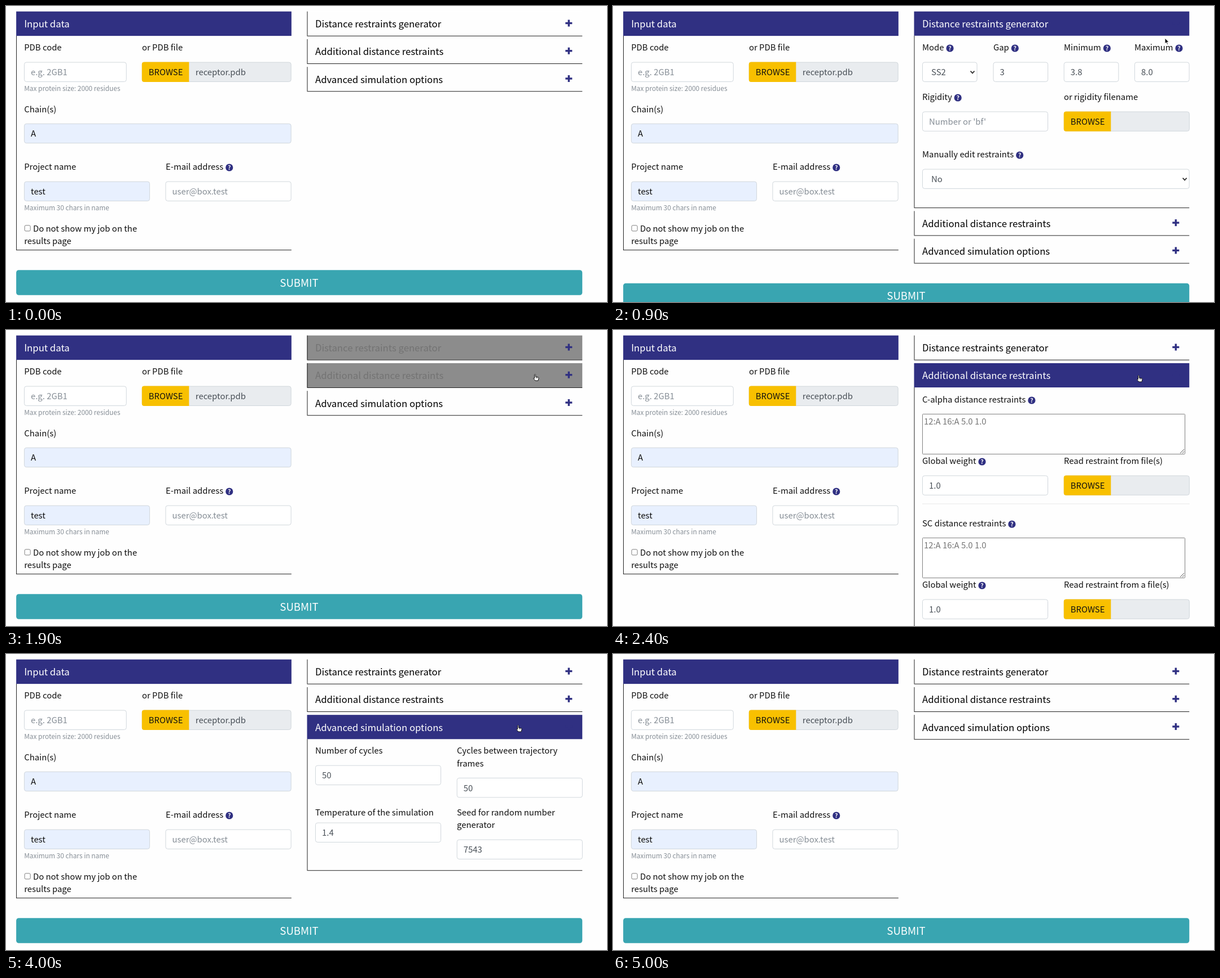
Animation, 1065 px wide and 526 px high, one loop 5300 ms. Source, as an HTML page with a canvas:

```html
<!DOCTYPE html>
<html lang="en">
<head>
<meta charset="utf-8">
<title>Simulation form</title>
<style>
  html, body { margin: 0; width: 100%; height: 100%; overflow: hidden; background: #fefefe; }
  canvas { display: block; }
</style>
</head>
<body>
<canvas id="stage" width="1065" height="526"></canvas>
<script>
const ctx = document.getElementById('stage').getContext('2d');
const LOOP = 5300, STEP = 100;
const FAMILY = '"Noto Sans CJK JP", "Noto Sans CJK SC", "Noto Sans CJK KR", "Noto Sans", sans-serif';
const NAVY = '#303082', YELLOW = '#f8c000', TEAL = '#39a5b1', INK = '#111';
const VALUE = '#495057', MUTED = '#868e96', BORDER = '#ced4da', AUTOFILL = '#e8f0fe';

// The form is shown at slightly under full size, so edges fall between pixels.
const SCALE = 0.929;
const BODY = 16 * SCALE, HEADING = 18 * SCALE, SMALL = 12.8 * SCALE, LARGE = 20 * SCALE;
const CONTROL = 38 * SCALE, LINE = SCALE;
const LEFT = 18.1, RIGHT = 533.5, COLUMN = 525 * SCALE;

const clamp = v => Math.min(1, Math.max(0, v));
const swing = v => 0.5 - Math.cos(Math.PI * clamp(v)) / 2;
const mix = (a, b, p) => a + (b - a) * p;

// ---- drawing helpers -------------------------------------------------

function rect(x, y, w, h, color) {
  ctx.fillStyle = color;
  ctx.fillRect(x, y, w, h);
}

function roundRect(x, y, w, h, radius, color) {
  ctx.beginPath();
  ctx.roundRect(x, y, w, h, radius);
  ctx.fillStyle = color;
  ctx.fill();
}

function line(points, color, width) {
  ctx.beginPath();
  points.forEach(([x, y]) => ctx.lineTo(x, y));
  ctx.strokeStyle = color;
  ctx.lineWidth = width;
  ctx.stroke();
}

// y is the middle of the capital letters
function text(str, x, y, color = INK, size = BODY, align = 'left') {
  ctx.font = `${size}px ${FAMILY}`;
  ctx.textAlign = align;
  ctx.fillStyle = color;
  ctx.fillText(str, x, y + size * 0.366);
}

function label(str, x, y, help) {
  text(str, x, y);
  if (!help) return;
  const cx = x + ctx.measureText(str).width + 10.5;
  ctx.beginPath();
  ctx.arc(cx, y + 1, 6.6, 0, 7);
  ctx.fillStyle = NAVY;
  ctx.fill();
  ctx.font = `bold 10.5px ${FAMILY}`;
  ctx.textAlign = 'center';
  ctx.fillStyle = '#fff';
  ctx.fillText('?', cx, y + 4.9);
}

function box(x, y, w, h, fill, stroke = BORDER, radius = 4 * SCALE) {
  roundRect(x + LINE / 2, y + LINE / 2, w - LINE, h - LINE, radius, fill);
  ctx.strokeStyle = stroke;
  ctx.lineWidth = LINE;
  ctx.stroke();
}

function input(str, x, y, w, color = VALUE, fill = '#fff') {
  box(x, y, w, CONTROL, fill);
  text(str, x + 12, y + 18.2, color);
}

function select(str, x, y, w) {
  box(x, y, w, CONTROL, '#fff');
  text(str, x + 16, y + 18.2, VALUE);
  const cx = x + w - 8.5, cy = y + 18;
  line([[cx - 3.5, cy - 2], [cx, cy + 1.8], [cx + 3.5, cy - 2]], '#333', 1.8);
}

function filePicker(x, y, w, name = '') {
  box(x, y, w, CONTROL, '#e9ecef');
  roundRect(x, y, 83.5, CONTROL, [4, 0, 0, 4], YELLOW);
  text('BROWSE', x + 12, y + 18.2);
  text(name, x + 95, y + 18.2, VALUE);
}

function textarea(str, x, y, w, h) {
  box(x, y, w, h, '#fff', '#767676', 1);
  text(str, x + 3, y + 14, '#757575');
  const r = x + w - 2, b = y + h - 2;
  line([[r - 7, b], [r, b - 7]], '#555', 1);
  line([[r - 3, b], [r, b - 3]], '#555', 1);
}

function plus(x, y) {
  rect(x - 6, y - 1.7, 12, 3.4, NAVY);
  rect(x - 1.7, y - 6, 3.4, 12, NAVY);
}

// ---- static left column ----------------------------------------------

function drawInputPanel() {
  rect(LEFT, 53, LINE, 381, INK);
  rect(LEFT, 433.2, COLUMN, LINE, INK);
  rect(LEFT, 9.7, COLUMN, 43.4, NAVY);
  text('Input data', 32.2, 32, '#fff', HEADING);
  label('PDB code', 32.2, 74);
  label('or PDB file', 241, 74);
  input('e.g. 2GB1', 32, 99.6, 181.7, MUTED);
  filePicker(240.8, 99.6, 264.8, 'receptor.pdb');
  text('Max protein size: 2000 residues', 32.2, 147, MUTED, SMALL);
  label('Chain(s)', 32.2, 183.2);
  input('A', 32, 208.8, 473.6, INK, AUTOFILL);
  label('Project name', 32.2, 286);
  label('E-mail address', 283, 286, true);
  input('test', 32, 311.6, 223, INK, AUTOFILL);
  input('user@box.test', 282.5, 311.6, 223.1, MUTED);
  text('Maximum 30 chars in name', 32.2, 359, MUTED, SMALL);
  box(32.6, 389.4, 11, 11, '#fff', '#767676', 2);
  text('Do not show my job on the', 48, 395.3);
  text('results page', 32.2, 417.6);
}

// ---- accordion -------------------------------------------------------

function generatorBody() {
  label('Mode', 548, 74, true);
  label('Gap', 674, 74, true);
  label('Minimum', 799, 74, true);
  label('Maximum', 924, 74, true);
  select('SS2', 548, 99.6, 97.5);
  input('3', 673.6, 99.6, 97.5);
  input('3.8', 798.8, 99.6, 97.5);
  input('8.0', 924, 99.6, 97.5);
  label('Rigidity', 548, 162, true);
  label('or rigidity filename', 799, 162);
  input("Number or 'bf'", 548, 187.5, 223, MUTED);
  filePicker(798.8, 187.5, 223);
  label('Manually edit restraints', 548, 264, true);
  select('No', 548, 289.6, 473.6);
}

function restraintGroup(title, fileLabel, y) {
  label(title, 548, y, true);
  textarea('12:A 16:A 5.0 1.0', 548, y + 25, 466, 72);
  label('Global weight', 548, y + 109, true);
  label(fileLabel, 799, y + 109);
  input('1.0', 548, y + 134.5, 223);
  filePicker(798.8, y + 134.5, 223);
}

function restraintsBody() {
  restraintGroup('C-alpha distance restraints', 'Read restraint from file(s)', 124);
  rect(548, 308.5, 473.6, LINE, '#e5e5e5');
  restraintGroup('SC distance restraints', 'Read restraint from a file(s)', 344);
}

function advancedBody() {
  label('Number of cycles', 548, 172);
  input('50', 548, 197.7, 223);
  label('Cycles between trajectory', 799, 172);
  label('frames', 799, 194.3);
  input('50', 798.8, 220, 223);
  label('Temperature of the simulation', 548, 281.8);
  input('1.4', 548, 299.6, 223);
  label('Seed for random number', 799, 281.8);
  label('generator', 799, 304);
  input('7543', 798.8, 329.6, 223);
}

const CLOSED = { bg: [254, 254, 254], fg: [0, 0, 0] };
const HOVER = { bg: [0, 0, 0], fg: [255, 255, 255] };
const OPEN = { bg: [48, 48, 130], fg: [255, 255, 255] };

const FIRST_TOP = 9.7, PITCH = 53 * SCALE, HEAD = 43.1;
const cards = [
  { title: 'Distance restraints generator', body: generatorBody, height: 305.4,
    enter: 90, open: 690, close: 1590, leave: 1790 },
  { title: 'Additional distance restraints', body: restraintsBody, height: 433,
    enter: 1810, open: 2190, close: 3090, leave: 3380 },
  { title: 'Advanced simulation options', body: advancedBody, height: 233,
    enter: 3382, open: 3690, close: 4590, leave: 4700 },
];

function headerColor(card, part, t) {
  const states = [[-1e4, CLOSED], [card.enter, HOVER], [card.open, OPEN],
                  [card.close, HOVER], [card.leave, CLOSED]];
  const i = states.findLastIndex(([start]) => start <= t);
  const to = states[i][1][part], from = states[Math.max(0, i - 1)][1][part];
  const p = clamp((t - states[i][0]) / 200);
  return `rgb(${to.map((v, k) => Math.round(mix(from[k], v, p)))})`;
}

// Draws the cards from the top down and returns the lower edge of the last one.
function drawAccordion(t) {
  let offset = 0, bottom = 0;
  cards.forEach((card, i) => {
    const top = FIRST_TOP + PITCH * i + offset;
    const headEnd = top + HEAD;
    const shown = swing((t - card.open - 45) / 165) - swing((t - card.close - 10) / 165);
    offset += card.height * shown;
    bottom = headEnd + card.height * shown;

    if (shown > 0) {
      ctx.save();
      ctx.beginPath();
      ctx.rect(RIGHT, headEnd, COLUMN + 2, bottom - headEnd);
      ctx.clip();
      ctx.translate(0, -10 * (1 - shown));
      card.body();
      ctx.restore();
    }
    rect(RIGHT, top, COLUMN, HEAD, headerColor(card, 'bg', t));
    const lineTop = shown > 0 ? headEnd : top;
    rect(RIGHT, lineTop, LINE, bottom - lineTop, INK);
    rect(RIGHT, bottom, COLUMN, LINE, INK);
    text(card.title, 548, top + 22.3, headerColor(card, 'fg', t), HEADING);
    plus(997.3, top + 20.8);
  });
  return bottom;
}

function drawSubmit(columnBottom) {
  const y = Math.max(433.2, columnBottom) + 36;
  roundRect(LEFT, y, RIGHT + COLUMN - LEFT, 48 * SCALE, 4.5, TEAL);
  text('SUBMIT', 519.5, y + 23, '#fff', LARGE, 'center');
}

// ---- mouse pointer ---------------------------------------------------

const ARROW = new Path2D('M0 0V10L2.4 7.9L4 11.6L5.6 10.9L4 7.3H7.2Z');
const HAND = new Path2D('M2.5 8V1.2Q3.4 0 4.3 1.2V5L9 6Q10 6.4 10 7.5L9 12H4L.6 8.2Q.6 6.8 2.5 8Z');
const route = [
  [100, 985, 47], [400, 975, 41], [700, 975, 41], [900, 978, 57], [1200, 941, 40],
  [1300, 940, 39], [1600, 940, 39], [1900, 934, 78], [2000, 932, 79], [2200, 932, 79],
  [2400, 928, 80], [3100, 928, 80], [3400, 922, 119], [3600, 918, 122], [3700, 918, 122],
  [4000, 904, 126], [4600, 904, 126], [4900, 1046, 90], [5000, 1065, 84],
];

function drawPointer(t) {
  const next = route.findIndex(([time]) => time > t);
  if (next < 1) return;
  const [t0, x0, y0] = route[next - 1], [t1, x1, y1] = route[next];
  const p = (t - t0) / (t1 - t0);
  const isArrow = (t >= 800 && t < 1200) || t >= 4700;
  const shape = isArrow ? ARROW : HAND;
  ctx.save();
  ctx.translate(mix(x0, x1, p), mix(y0, y1, p));
  ctx.lineWidth = 1;
  ctx.lineJoin = 'round';
  ctx.strokeStyle = isArrow ? '#fff' : '#111';
  ctx.fillStyle = isArrow ? '#111' : '#fff';
  ctx.fill(shape);
  ctx.stroke(shape);
  if (!isArrow) {
    line([[5.5, 6], [5.5, 8]], '#111', 0.7);
    line([[7.5, 6.4], [7.5, 8]], '#111', 0.7);
  }
  ctx.restore();
}

// ---- loop ------------------------------------------------------------

function render(now) {
  // the picture advances ten times a second
  const t = Math.floor((now % LOOP) / STEP) * STEP;
  rect(0, 0, 1065, 526, '#fefefe');
  drawInputPanel();
  drawSubmit(drawAccordion(t));
  drawPointer(t);
}

const start = performance.now();
function tick() {
  render(performance.now() - start);
  requestAnimationFrame(tick);
}
tick();
</script>
</body>
</html>
```
